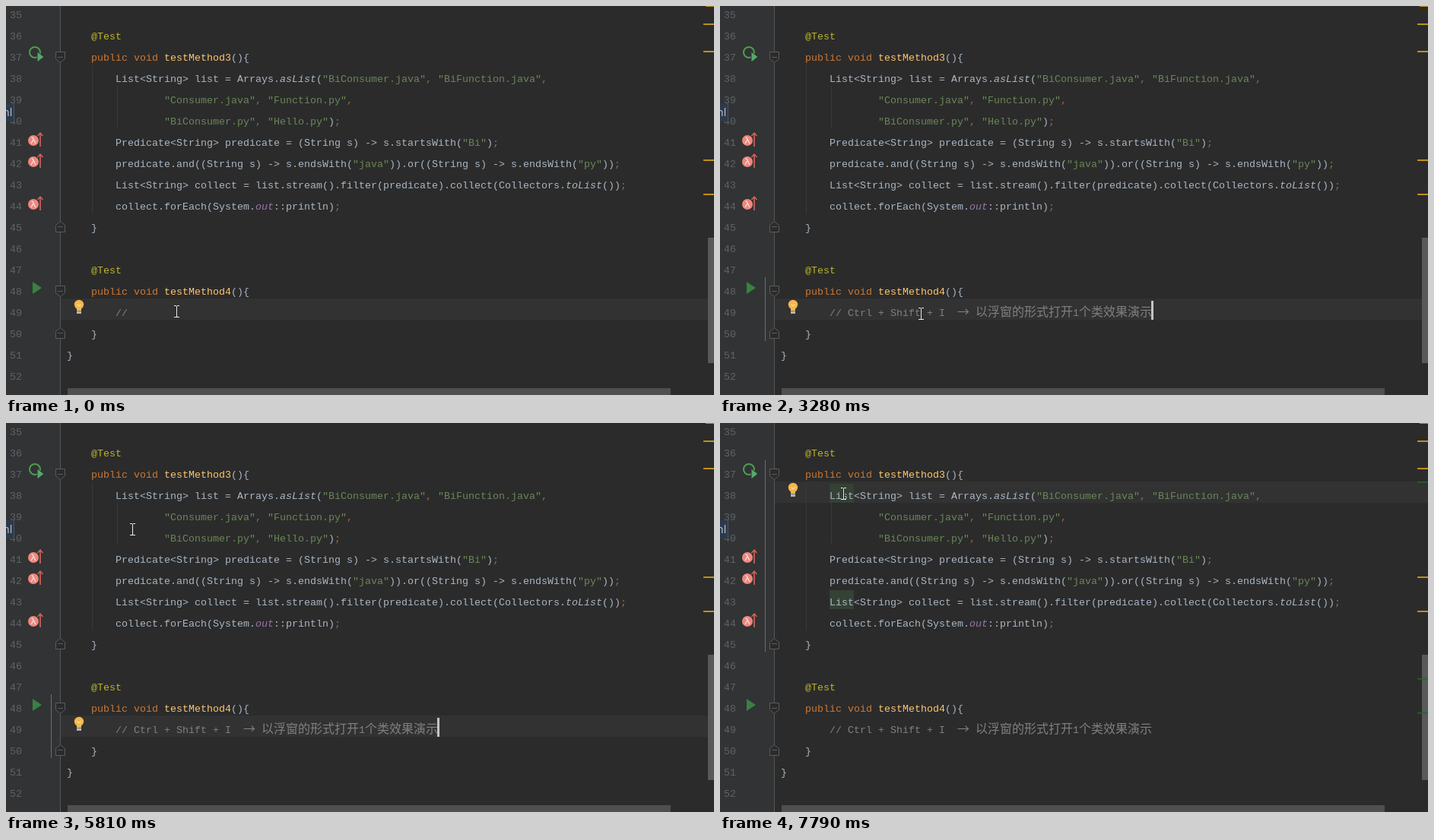
Write an HTML page with a canvas that moves like this. It is 931x512 px and loops after 8 s.

```html
<!DOCTYPE html>
<html lang="zh">
<head>
<meta charset="utf-8">
<style>
  html, body { margin: 0; width: 100%; height: 100%; overflow: hidden; background: #2b2b2b; }
  canvas { display: block; }
</style>
</head>
<body>
<canvas id="stage" width="931" height="512"></canvas>
<script>
const ctx = document.getElementById('stage').getContext('2d');
const LOOP = 8000, CELL = 8, ROW = 28;

const COLORS = {
  plain: '#a9b7c6', keyword: '#cc7832', mark: '#9b6a43', string: '#6a8759', note: '#808080',
  annotation: '#bbb529', method: '#ffc66d', field: '#9876aa', number: '#606366'
};

const CODE = {
  36: [112, '@Test'],
  37: [112, 'public void testMethod3(){'],
  38: [144, 'List<String> list = Arrays.asList("BiConsumer.java", "BiFunction.java",'],
  39: [208, '"Consumer.java", "Function.py",'],
  40: [208, '"BiConsumer.py", "Hello.py");'],
  41: [144, 'Predicate<String> predicate = (String s) -> s.startsWith("Bi");'],
  42: [144, 'predicate.and((String s) -> s.endsWith("java")).or((String s) -> s.endsWith("py"));'],
  43: [144, 'List<String> collect = list.stream().filter(predicate).collect(Collectors.toList());'],
  44: [144, 'collect.forEach(System.out::println);'],
  45: [112, '}'],
  47: [112, '@Test'],
  48: [112, 'public void testMethod4(){'],
  50: [112, '}'],
  51: [80, '}']
};
const COMMENT = '// Ctrl + Shift + I  → 以浮窗的形式打开1个类效果演示';

// Times at which the caret turns on and off, alternately
const BLINKS = [400, 930, 1490, 1920, 2330, 2730, 3130, 3550, 3980, 4400,
  4810, 5380, 5810, 6350, 6630, 7790];

// Pointer stops: time, x, y
const POINTER = [
  [0, 224, 402], [3130, 224, 402], [3410, 303, 407], [4260, 303, 407],
  [4810, 580, 401], [4960, 580, 401], [5260, 112, 153], [5530, 168, 153],
  [5810, 166, 140], [6210, 162, 93], [LOOP, 162, 93]
];
const POINTER_TICKS = [0, 3130, 3270, 3410, 4260, 4400, 4540, 4680, 4810,
  4960, 5110, 5260, 5380, 5530, 5810, 5950, 6070, 6210];

const LATIN = '"Liberation Mono", monospace';
const HAN = '"Noto Sans Mono CJK SC", "Noto Sans CJK SC", sans-serif';
ctx.font = '16px ' + LATIN;
const latinSize = 16 * CELL / ctx.measureText('M').width;

const rowTop = row => 385 + (row - 49) * ROW;
const between = (t, from, to) => t >= from && t < to;

function rect(x, y, w, h, color) {
  ctx.fillStyle = color;
  ctx.fillRect(x, y, w, h);
}

function path(points, { fill, stroke, width = 1, close = true }) {
  ctx.beginPath();
  points.forEach(([x, y]) => ctx.lineTo(x, y));
  if (close) ctx.closePath();
  if (fill) { ctx.fillStyle = fill; ctx.fill(); }
  if (stroke) { ctx.strokeStyle = stroke; ctx.lineWidth = width; ctx.stroke(); }
}

function disc(x, y, r, color) {
  ctx.beginPath();
  ctx.arc(x, y, r, 0, Math.PI * 2);
  ctx.fillStyle = color;
  ctx.fill();
}

// Writes text on the editor's cell grid and returns the end position
function write(text, x, row, color, italic = false) {
  ctx.fillStyle = color;
  for (const char of text) {
    const wide = char > '\u2000';
    const font = wide ? `16px ${HAN}` : `${latinSize}px ${LATIN}`;
    ctx.font = italic ? 'italic ' + font : font;
    ctx.fillText(char, x, rowTop(row) + 23);
    x += wide ? CELL * 2 : CELL;
  }
  return x;
}

function tokenColor(token) {
  if (token[0] === '"') return COLORS.string;
  if (token[0] === '@') return COLORS.annotation;
  if (/^(public|void)$/.test(token)) return COLORS.keyword;
  if (/^[;,]$/.test(token)) return COLORS.mark;
  if (/^testMethod/.test(token)) return COLORS.method;
  return token === 'out' ? COLORS.field : COLORS.plain;
}

function writeCode(text, x, row) {
  for (const token of text.match(/"[^"]*"|@?\w+|\s+|./g)) {
    x = write(token, x, row, tokenColor(token), /^(asList|toList|out)$/.test(token));
  }
}

function foldMark(row, up) {
  const y = rowTop(row) + (up ? 17 : 18), d = up ? -1 : 1;
  path([[65.5, y - 7 * d + .5], [77.5, y - 7 * d + .5], [77.5, y + 2 * d + .5],
    [71.5, y + 7 * d + .5], [65.5, y + 2 * d + .5]], { fill: '#2b2b2b', stroke: '#5a5c5e' });
  rect(68, y, 7, 1, '#5a5c5e');
}

function lambdaMark(row) {
  const y = rowTop(row) + 16;
  disc(36, y, 7, '#ee877d');
  path([[33.5, y - 4], [35, y - 4], [39, y + 4]], { stroke: '#fbe6e3', width: 1.2, close: false });
  path([[36, y - 1], [33, y + 4]], { stroke: '#fbe6e3', width: 1.2, close: false });
  path([[45, y + 8], [45, y - 10]], { stroke: '#d9655a', width: 1.6, close: false });
  path([[41.5, y - 6], [45, y - 10], [48.5, y - 6]], { stroke: '#d9655a', width: 1.4, close: false });
}

function bulb(row) {
  const y = rowTop(row) + 8;
  disc(96, y, 6.2, '#f4b74c');
  rect(93, y + 4, 6, 4, '#f4b74c');
  path([[93, y - 1], [95, y + 2], [96, y], [97, y + 2], [99, y - 1]],
    { stroke: '#fbe3a8', close: false });
  rect(93, y + 8, 6, 1, '#777');
  rect(93, y + 9, 6, 3, '#b5b5b5');
}

function gutter() {
  rect(0, 0, 71, 512, '#313335');
  rect(71, 0, 1, 512, '#555759');
  for (let row = 35; row <= 52; row++) write(String(row), 5, row, COLORS.number);

  ctx.beginPath();
  ctx.arc(38, 61, 7, 0, Math.PI * 2);
  ctx.strokeStyle = '#4f9d4f';
  ctx.lineWidth = 2;
  ctx.stroke();
  path([[41, 60], [50, 67], [41, 74]], { fill: '#59a869', stroke: '#313335' });
  path([[35, 363], [47, 371], [35, 379]], { fill: '#37823f' });
  [41, 42, 44].forEach(lambdaMark);
  [37, 48].forEach(row => foldMark(row, false));
  [45, 50].forEach(row => foldMark(row, true));

  rect(0, 128, 11, 24, '#2d3a4b');
  rect(10, 128, 1, 24, '#46566a');
  ctx.font = '14px "Noto Sans", sans-serif';
  ctx.fillStyle = '#b8c0ca';
  ctx.fillText('nl', -4, 145);
}

function scopeLine(t) {
  if (between(t, 2730, 6910)) rect(59, 357, 1, 84, '#6c6e70');
  if (t >= 7050) rect(59, 49, 1, 252, '#6c6e70');
}

function scrollbars(t) {
  rect(923, 305, 8, 165, '#595959');
  rect(81, 503, 793, 9, '#4f4f4f');
  [23, 59, 202, 247].forEach(y => rect(917, y, 14, 2, '#be9117'));
  if (!between(t, 2330, 2850)) rect(920, 0, 11, 1, '#be9117');
  if (t >= 6770) [77, 336, 381].forEach(y => rect(917, y, 14, 1.5, '#147026'));
}

function pointerAt(t) {
  const tick = POINTER_TICKS.filter(time => time <= t).pop();
  const i = Math.max(1, POINTER.findIndex(stop => stop[0] >= tick));
  const [t0, x0, y0] = POINTER[i - 1], [t1, x1, y1] = POINTER[i];
  const k = (tick - t0) / (t1 - t0);
  return [Math.round(x0 + (x1 - x0) * k), Math.round(y0 + (y1 - y0) * k)];
}

function pointer(t) {
  const [x, y] = pointerAt(t);
  rect(x - 1, y - 7, 3, 15, '#2b2b2b');
  rect(x, y - 7, 1, 15, '#eee');
  for (const edge of [y - 8, y + 7]) {
    rect(x - 3, edge, 3, 1, '#eee');
    rect(x + 1, edge, 3, 1, '#eee');
  }
}

function draw(t) {
  const pasted = t >= 2330, clicked = t >= 6630;
  const activeRow = clicked ? 38 : 49;

  rect(0, 0, 931, 512, '#2b2b2b');
  rect(72, rowTop(activeRow), 859, ROW, '#323232');
  rect(113, 78, 1, 195, '#393939');
  rect(146, 105, 1, 55, '#393939');
  gutter();
  scopeLine(t);

  if (t >= 6770) [38, 43].forEach(row => rect(144, rowTop(row) + 3, 32, 25, '#344134'));
  for (const row in CODE) writeCode(CODE[row][1], CODE[row][0], +row);
  write(pasted ? COMMENT : '//', 144, 49, COLORS.note);

  if (t < 2330 || between(t, 3130, 6630) || t >= 7360) bulb(activeRow);
  if (BLINKS.filter(time => time <= t).length % 2) {
    rect(clicked ? 159 : pasted ? 567 : 167, rowTop(activeRow) + 3, 3, 25, '#c4c4c4');
  }
  scrollbars(t);
  pointer(t);
}

function tick() {
  draw(performance.now() % LOOP);
  requestAnimationFrame(tick);
}
tick();
</script>
</body>
</html>
```
